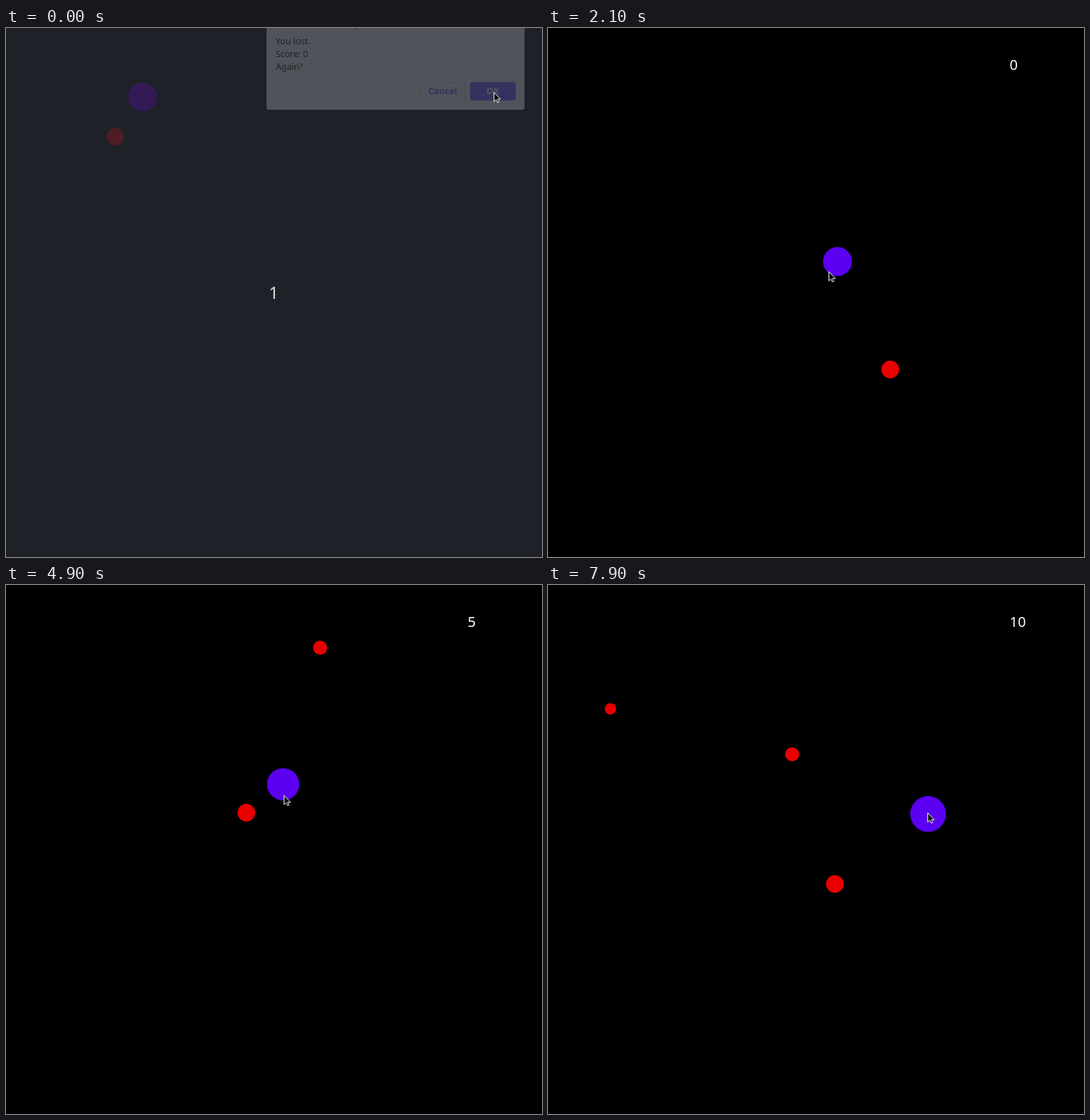
Animation of 753x744 px, one loop 8 s. Source, as an HTML page with a canvas:

```html
<!DOCTYPE html>
<html lang="en">
<head>
<meta charset="utf-8">
<title>Dodge the dots</title>
<style>
  html, body { margin: 0; width: 100%; height: 100%; overflow: hidden; background: #000; }
  canvas { display: block; }
</style>
</head>
<body>
<canvas id="stage" width="753" height="744"></canvas>
<script>
const ctx = document.getElementById('stage').getContext('2d');
const W = 753, H = 744, LOOP = 8000, STEP = 100, START = 300;
const LEVEL = 755;   // distance between two new dots
const MARGIN = 14;   // how far dots run past the right and bottom edges
const FONT = '"Noto Sans", "Open Sans", sans-serif';

// [time, distance covered since the start]
const travel = [
  [200, -4], [1400, 307], [3000, 703], [4200, 1019], [6700, 1650.5], [7900, 1945.5]
];

// [time, x, y] of the player; the pointer runs one step ahead
const path = [
  [START, 686, 92], [900, 552, 300], [1400, 522, 383.3], [1500, 484, 391.5],
  [1900, 430, 297], [2600, 348.5, 407], [3100, 348.5, 407],
  [4200, 405.5, 184.3], [4300, 378.5, 178], [5300, 396.5, 348.5],
  [5800, 396.5, 348.5], [6500, 599.5, 80], [6800, 599.5, 80], [7800, 534, 322]
];

// direction of each dot, all leaving the top left corner
const dirs = [[1, 1], [1, 0.2], [0.2, 0.4]];

function at(keys, t) {
  const n = keys.findIndex(k => k[0] > t);
  const i = n < 0 ? keys.length - 1 : Math.max(n, 1);
  const a = keys[i - 1], b = keys[i];
  const f = Math.min(1, Math.max(0, (t - a[0]) / (b[0] - a[0])));
  return a.slice(1).map((v, j) => v + (b[j + 1] - v) * f);
}

function bounce(v, max) {
  const min = -4.5, span = max - min;
  const m = Math.abs(v - min) % (2 * span);
  return min + span - Math.abs(span - m);
}

function disc(x, y, r, color) {
  ctx.fillStyle = color;
  ctx.beginPath();
  ctx.arc(x, y, r, 0, 2 * Math.PI);
  ctx.fill();
}

function box(x, y, w, h, r, color) {
  ctx.fillStyle = color;
  ctx.beginPath();
  ctx.roundRect(x, y, w, h, r);
  ctx.fill();
}

function text(str, x, y, size, color, align = 'left', weight = 400) {
  ctx.font = `${weight} ${size}px ${FONT}`;
  ctx.textAlign = align;
  ctx.fillStyle = color;
  ctx.fillText(str, x, y);
}

function pointer(x, y) {
  ctx.save();
  ctx.translate(x, y);
  const arrow = new Path2D('M0 0V13L3 10.4L5 14.5L7 13.6L5.2 9.6H9.2Z');
  ctx.fillStyle = '#111';
  ctx.fill(arrow);
  ctx.strokeStyle = '#eee';
  ctx.stroke(arrow);
  ctx.restore();
}

function dialog(alpha) {
  ctx.globalAlpha = alpha;
  box(366, -20, 362.5, 135, 4, '#505359');
  box(491, -1, 4, 2, 0, '#2c2e33');
  ['You lost.', 'Score: 0', 'Again?'].forEach((s, i) =>
    text(s, 379, 23 + 18 * i, 12.3, '#202227'));
  box(581.5, 76, 64, 26, 3, '#4b4d57');
  box(582.5, 77, 62, 24, 2, '#505359');
  box(652, 76, 64, 26, 3, '#35325f');
  text('Cancel', 613.5, 93, 12.3, '#34315f', 'center', 600);
  text('OK', 684, 93, 12.3, '#53545f', 'center', 600);
  ctx.globalAlpha = 1;
}

function countdown(t) {
  box(0, 0, W, H, 0, '#1e2128');
  disc(192, 97, 20.3, '#331a57');
  disc(153.8, 152.7, 12.3, '#4d1c25');
  text('1', 376, 381, 24, '#dedede', 'center');
  dialog(Math.max(0, 1 - t / 170));
}

function game(t) {
  box(0, 0, W, H, 0, '#000');
  const [u] = at(travel, t);
  const level = Math.floor(u / LEVEL);
  text(String(level * 5), 648.5, 58.5, 20, '#fff');
  disc(...at(path, t), 20.4 * 1.11 ** level, '#5c00f2');
  dirs.slice(0, level + 1).forEach(([dx, dy], i) => {
    const s = u - i * LEVEL;
    disc(bounce(s * dx + 0.5, W + MARGIN), bounce(s * dy, H + MARGIN),
         12.4 * 0.8 ** i, '#e80000');
  });
}

function draw(now) {
  const t = Math.floor((now % LOOP) / STEP) * STEP;
  (t < START ? countdown : game)(t);
  const [x, y] = at(path, t + STEP);
  pointer(x - 0.5, y - 1.5);
}

let begin;
function frame(now) {
  begin ??= now;
  draw(now - begin);
  requestAnimationFrame(frame);
}
draw(0);
requestAnimationFrame(frame);
</script>
</body>
</html>
```
